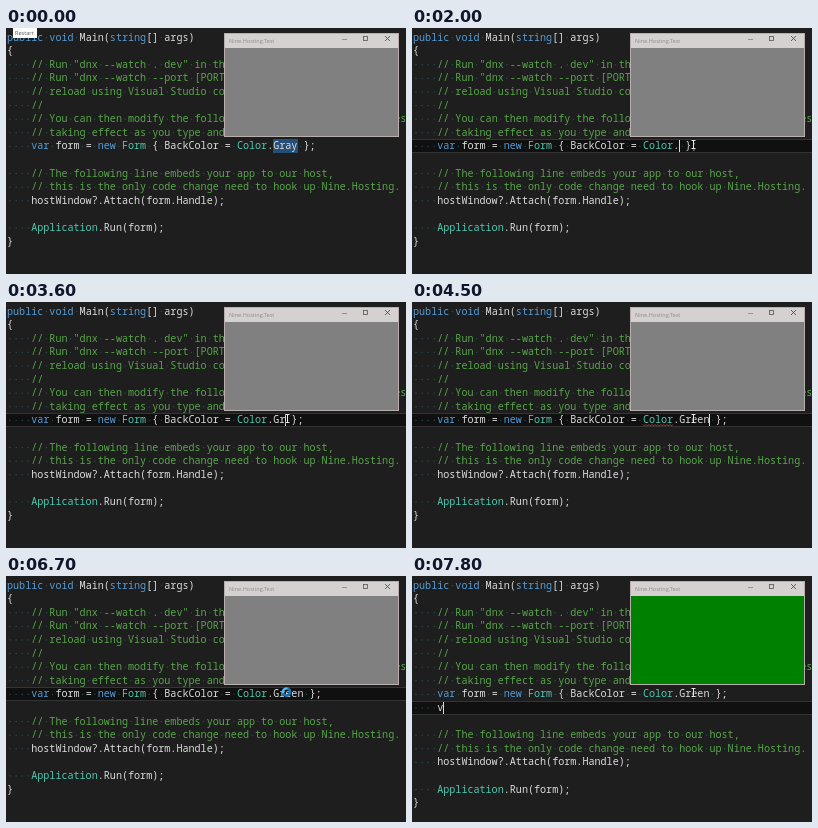
An HTML page with a canvas that plays this animation: 400x246 px, repeating every 8 s.

```html
<!DOCTYPE html>
<html lang="en">
<head>
<meta charset="utf-8">
<style>
  html, body { margin: 0; width: 100%; height: 100%; overflow: hidden; background: #1e1e1e; }
  canvas { display: block; }
</style>
</head>
<body>
<canvas width="400" height="246"></canvas>
<script>
const ctx = document.querySelector('canvas').getContext('2d');
const LOOP = 8000, COL = 6.05, ROW = 13.6, LEFT = 1, FORM_ROW = 8;
const CODE_FONT = '500 10.08px "Noto Sans Mono", monospace';
const KEYWORDS = /^(public|void|string|var|new)$/;
const TYPES = /^(Form|Color|Application)$/;
const BEFORE = [
  'public void Main(string[] args)',
  '{',
  '    // Run "dnx --watch . dev" in the',
  '    // Run "dnx --watch --port [PORT]',
  '    // reload using Visual Studio code',
  '    //',
  '    // You can then modify the following lines and see the changes',
  '    // taking effect as you type and save'
];
const AFTER = [
  '',
  '    // The following line embeds your app to our host,',
  '    // this is the only code change need to hook up Nine.Hosting.',
  '    hostWindow?.Attach(form.Handle);',
  '',
  '    Application.Run(form);',
  '}'
];
const FORM_START = '    var form = new Form { BackColor = ';

// Each entry: start time, value held until the next entry.
const COLOR_EDITS = [
  [0, 'Color.Gray'], [2000, 'Color.'], [2500, 'Color'], [3000, 'Color.'], [3300, 'Color.G'],
  [3500, 'Color.Gr'], [3700, 'Color.Gre'], [3900, 'Color.Gree'], [4100, 'Color.Green']
];
const POINTER_PATH = [[300, 20, 4], [800, 284, 131], [1200, 284, 131], [1300, 280, 125], [1600, 281, 116]];

const between = (t, from, to) => t >= from && t < to;
const colX = col => LEFT + col * COL;
const rowTop = row => Math.round(2.2 + row * ROW);
const valueAt = (steps, t) => steps.filter(([start]) => start <= t).pop()[1];

function rect(color, x, y, w, h) {
  ctx.fillStyle = color;
  ctx.fillRect(x, y, w, h);
}

function text(str, x, y, color, font) {
  ctx.font = font;
  ctx.fillStyle = color;
  ctx.fillText(str, x, y);
}

function stroke(color, width, points) {
  ctx.strokeStyle = color;
  ctx.lineWidth = width;
  ctx.beginPath();
  points.forEach(([x, y]) => ctx.lineTo(x, y));
  ctx.stroke();
}

function drawLine(line, row) {
  const y = 12.6 + row * ROW;
  const comment = line.trim().startsWith('//');
  for (const { 0: token, index } of line.matchAll(/\w+|[^\w\s]+| /g)) {
    const x = colX(index);
    if (token === ' ') {
      rect('#28565f', x + 2.5, y - 3.6, 1.1, 1.1);
      continue;
    }
    const color = comment ? '#57a64a' : KEYWORDS.test(token) ? '#569cd6'
      : TYPES.test(token) ? '#4ec9b0' : '#dcdcdc';
    text(token, x, y, color, CODE_FONT);
  }
}

function drawBand(row) {
  const y = rowTop(row);
  rect('#343434', 0, y, 400, 14);
  rect('#101010', 0, y + 1, 400, 12);
}

function drawCaret(col, row) {
  rect('#dcdcdc', Math.round(colX(col)), rowTop(row) + 1, 1, 12);
}

function drawSquiggle(from, to) {
  const points = [];
  for (let x = colX(from), i = 0; x < colX(to); x += 1.5, i++) points.push([x, 122.5 + (i % 2) * 1.5]);
  stroke('#e03c32', 0.8, points);
}

function drawWindow(fill) {
  rect('#b9aeae', 218, 5, 175, 104);
  rect('#d6d1d1', 219, 6, 173, 14);
  rect(fill, 219, 20, 173, 88);
  text('Nine.Hosting.Test', 223, 15, '#8f8b8b', '5.6px "Open Sans", sans-serif');
  stroke('#8a8686', 0.8, [[336, 11.5], [341, 11.5]]);
  ctx.strokeStyle = '#555';
  ctx.strokeRect(357.5, 8.5, 4, 4);
  stroke('#444', 0.8, [[379, 8], [384, 13]]);
  stroke('#444', 0.8, [[384, 8], [379, 13]]);
}

function drawTooltip() {
  rect('#fff', 7, 0, 24, 10);
  text('Restart', 9, 7, '#555', '5.6px "Open Sans", sans-serif');
}

function drawIBeam(x, y) {
  for (const [color, width] of [['#111', 2], ['#e8e8e8', 1]]) {
    stroke(color, width, [[x, y - 4], [x, y + 4]]);
    stroke(color, width, [[x - 2, y - 4], [x + 2, y - 4]]);
    stroke(color, width, [[x - 2, y + 4], [x + 2, y + 4]]);
  }
}

function drawSpinner(x, y) {
  const arc = (color, width, from, to) => {
    ctx.strokeStyle = color;
    ctx.lineWidth = width;
    ctx.beginPath();
    ctx.arc(x, y, 3.6, from, to);
    ctx.stroke();
  };
  arc('#1673b8', 2.6, 0, Math.PI * 2);
  arc('#5cc0ee', 1.8, 2.8, 5);
}

function drawPointer(t) {
  if (t < 300) return;
  if (between(t, 6100, 7200)) return drawSpinner(280.5, 116);
  const next = POINTER_PATH.findIndex(([time]) => time > t);
  if (next < 0) return drawIBeam(281.5, 116.5);
  const [t0, x0, y0] = POINTER_PATH[next - 1], [t1, x1, y1] = POINTER_PATH[next];
  const k = (t - t0) / (t1 - t0);
  drawIBeam(Math.round(x0 + (x1 - x0) * k) + 0.5, Math.round(y0 + (y1 - y0) * k) + 0.5);
}

function drawEditor(t) {
  const color = valueAt(COLOR_EDITS, t);
  const formLine = FORM_START + color + ' };';
  const newLine = t >= 7500 ? [t >= 7700 ? '    v' : '    '] : [];
  const caretRow = FORM_ROW + newLine.length;

  if (t >= 2000) drawBand(caretRow);
  else rect('#264f78', 267, rowTop(FORM_ROW), 25, 14);

  [...BEFORE, formLine, ...newLine, ...AFTER].forEach(drawLine);
  if (between(t, 4400, 5100)) drawSquiggle(FORM_START.length, FORM_START.length + 5);

  const caretOn = between(t, 2000, 4800) || between(t, 5200, 5700) || between(t, 6200, 6700) || t >= 7200;
  if (!caretOn) return;
  const caretCol = newLine.length ? newLine[0].length
    : t >= 5200 ? formLine.length : FORM_START.length + color.length;
  drawCaret(caretCol, caretRow);
}

function frame(now) {
  const t = Math.floor(now % LOOP / 100) * 100;
  rect('#1e1e1e', 0, 0, 400, 246);
  drawEditor(t);
  drawWindow(t < 7100 ? '#808080' : '#008000');
  if (t < 300) drawTooltip();
  drawPointer(t);
  requestAnimationFrame(frame);
}
requestAnimationFrame(frame);
</script>
</body>
</html>
```
